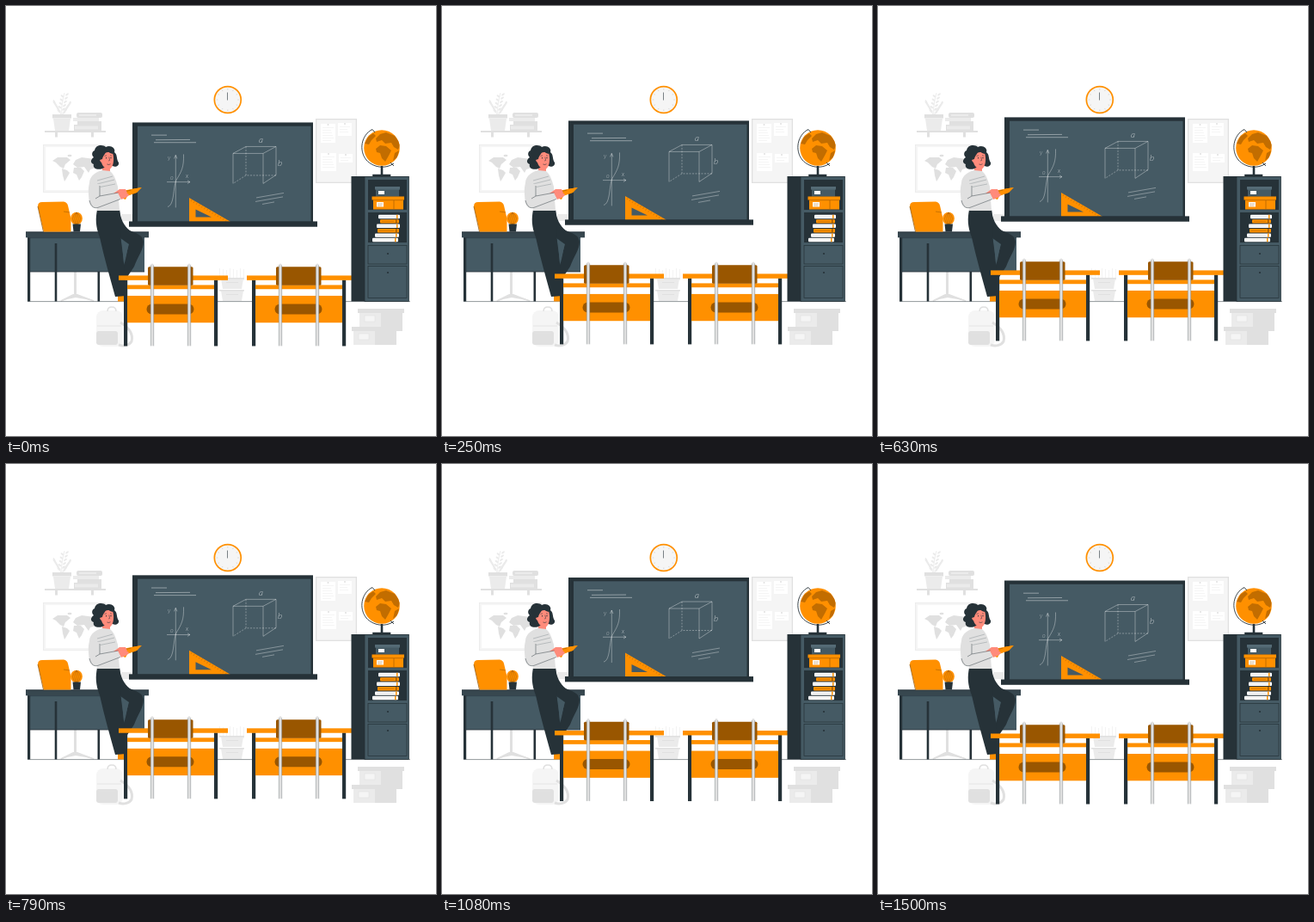
These frames come from a looping animation (500x500 px, 1.54 s). An HTML page with a canvas:

```html
<!DOCTYPE html>
<html lang="en">
<head>
<meta charset="utf-8">
<title>Classroom</title>
<style>
html, body { margin: 0; width: 100%; height: 100%; overflow: hidden; background: #fff; }
canvas { display: block; width: 500px; height: 500px; }
</style>
</head>
<body>
<canvas id="stage" width="500" height="500"></canvas>
<script>
const ctx = document.getElementById('stage').getContext('2d');
const ORANGE = '#ff9000', BROWN = '#995600', DARK = '#263238', SLATE = '#455a64';
const SKIN = '#ff8b7b', GREY = '#e0e0e0', PALE = '#ebebeb', FAINT = '#f5f5f5';
const LOOP = 1540, LIFT = 6.3, REST = 0.5, PEAK = 720;

function rect(x, y, w, h, color) {
  ctx.fillStyle = color;
  ctx.fillRect(x, y, w, h);
}
function round(x, y, w, h, r, color) {
  ctx.fillStyle = color;
  ctx.beginPath();
  ctx.roundRect(x, y, w, h, r);
  ctx.fill();
}
function frame(x, y, w, h, color, width = 0.6) {
  ctx.strokeStyle = color;
  ctx.lineWidth = width;
  ctx.strokeRect(x, y, w, h);
}
function fill(d, color) {
  ctx.fillStyle = color;
  ctx.fill(new Path2D(d));
}
function line(d, color, width = 0.6) {
  ctx.strokeStyle = color;
  ctx.lineWidth = width;
  ctx.stroke(new Path2D(d));
}
function oval(x, y, rx, ry, color, turn = 0) {
  ctx.fillStyle = color;
  ctx.beginPath();
  ctx.ellipse(x, y, rx, ry, turn, 0, 7);
  ctx.fill();
}
function shifted(x, y, draw) {
  ctx.save();
  ctx.translate(x, y);
  draw();
  ctx.restore();
}

function clock() {
  oval(257.8, 109, 16.3, 16.3, ORANGE);
  oval(257.8, 109, 14.6, 14.6, FAINT);
  for (let i = 0; i < 12; i++) {
    const a = i * Math.PI / 6, c = Math.cos(a), s = Math.sin(a);
    line(`M${257.8 + 11.5 * c} ${109 + 11.5 * s}L${257.8 + 13 * c} ${109 + 13 * s}`, '#b5b5b5', 0.5);
  }
  line('M257.5 100.5V109.5', DARK, 0.6);
}

function wallShelf() {
  rect(45, 145, 71, 2, GREY);
  rect(57, 147, 3, 5.5, GREY);
  rect(99, 147, 3, 5.5, GREY);
  fill('M55 131H75L73 145H57Z', PALE);
  rect(54, 126, 22, 4.5, GREY);
  line('M65 126C64 116 66 109 68 101M64 126C60 119 58 114 55 109M66 126C69 119 72 115 75 112', GREY, 0.6);
  for (let i = 0; i < 5; i++) {
    const y = 122 - i * 4.3, x = 64 + i;
    oval(x - 2.5, y, 2.2, 1.1, PALE, 0.6);
    oval(x + 3, y - 2, 2.2, 1.1, PALE, -0.6);
    oval(62 - i * 1.5, y * 0.6 + 49, 1.2, 2.2, PALE, -0.5);
    oval(68 + i * 1.6, y * 0.6 + 50, 1.2, 2.2, PALE, 0.5);
  }
  rect(79, 138, 32, 7, GREY);
  rect(80, 139.5, 27, 4, PALE);
  round(82, 124, 30, 6, 2, GREY);
  rect(78, 130, 30, 4, PALE);
  rect(83, 134, 28, 4, GREY);
  rect(85, 126, 20, 2, PALE);
}

function wallMap() {
  rect(43, 161, 73, 56, FAINT);
  frame(43.5, 161.5, 72, 55, PALE, 0.8);
  rect(46, 164, 67, 50, '#fff');
  fill('M54 180L60 176L71 176L75 179L69 184L67 189L63 187L58 182Z', GREY);
  fill('M65 189L71 191L74 194L70 201L68 204L66 197Z', GREY);
  fill('M78 184L81 179L88 176L103 178L110 182L105 188L98 190L96 194L91 187L83 188Z', GREY);
  fill('M79 188L87 188L91 192L88 199L85 203L82 196L78 194Z', GREY);
  oval(105, 199, 4.5, 3, GREY);
  oval(74, 174, 2.5, 1.3, GREY);
}

function notices() {
  rect(360, 131, 48, 75, GREY);
  rect(361.3, 132.3, 45.4, 72.4, FAINT);
  for (const [x, y, w, h] of [[366, 137, 17, 22], [386, 136, 16, 15], [366, 171, 18, 21], [387, 172, 16, 10]]) {
    rect(x, y, w, h, '#fff');
    oval(x + w / 2, y + 1, 1, 1, GREY);
    for (let k = 4; k < h - 2; k += 3) rect(x + 2, y + k, w - 4 - k % 4, 0.5, PALE);
  }
}

function floorItems() {
  rect(79, 309, 3, 27, GREY);
  fill('M62 343L78 335H83L104 343L81 339Z', GREY);
  line('M64 343L81 336L102 343', GREY, 1.5);

  round(105, 354, 31, 42, 8, FAINT);
  line('M118 355Q118 350 123 350Q128 350 128 355', GREY, 1.5);
  round(105, 378, 25, 16, 3, GREY);
  line('M133 368C143 374 148 382 146 390C143 395 136 396 131 394', GREY, 3);
  line('M106 372H134M108 381H127', GREY, 0.8);

  const box = (x, y, w, h) => {
    rect(x + 2, y + 5, w - 4, h - 5, PALE);
    rect(x, y, w, 5, GREY);
    rect(x + 8, y + 8, 12, 7, FAINT);
    frame(x + 8, y + 8, 12, 7, GREY);
  };
  box(409, 352, 54, 22);
  rect(436, 357, 25, 21, GREY);
  box(402, 373, 54, 21);
  rect(429, 378, 25, 16, GREY);

  for (let i = 0; i < 8; i++) rect(248 + i * 4, 305 + i % 3, 0.6, 13, PALE);
  for (const y of [317, 331]) {
    fill(`M250 ${y}H276L274 ${y + 12}H252Z`, PALE);
    rect(248, y - 1, 29, 1.5, GREY);
    rect(256, y + 4, 14, 1, GREY);
  }
  rect(134, 242, 13, 8, PALE);
}

function teacherDesk() {
  rect(26, 269, 135, 40, SLATE);
  rect(26, 269, 135, 1.2, '#34454e');
  line('M26 309H161', DARK, 0.8);
  rect(25, 269, 3.2, 74.5, DARK);
  rect(56.7, 276, 2.6, 67.5, DARK);
  rect(106.5, 309, 2.6, 34.5, DARK);
  rect(23, 262.5, 143, 6.8, '#37474f');
  line('M23 263H166', DARK, 0.8);

  fill('M37 233Q37 228 42 228L67 227.5Q71 228 72 232L75.5 247V262.5H44Z', ORANGE);
  line('M37 233L43.5 262.5', BROWN, 0.8);
  line('M67 239L74 240', BROWN, 0.5);
  oval(82, 247, 6.9, 7.3, ORANGE);
  for (let i = -2; i <= 2; i++) line(`M82 240Q${82 + i * 4.5} 247 82 255`, BROWN, 0.4);
  fill('M77.5 253.5H87L86 262.5H78.5Z', DARK);
}

function chalkboard() {
  const chalk = 'rgba(255,255,255,.7)';
  rect(147, 135, 210, 116, DARK);
  rect(153, 139.3, 201.5, 111, SLATE);
  line('M169 149.7H187M174 155.3L214 155M172 158.3H221', chalk, 0.6);
  line('M197.3 234V173M195.5 177L197.3 173L199 177M187 204.2H214M211 202.5L214 204.2L211 206', chalk, 0.5);
  line('M188 233C196 231 194 211 198 202C204 192 207 187 206.5 172', chalk, 0.5);
  line('M264 206V171H299V206M264 171L279 163H314L299 171M314 163V196L299 206', chalk, 0.5);
  ctx.setLineDash([2, 1.5]);
  line('M279 163V196.5H314M279 196.5L264 206', chalk, 0.5);
  ctx.setLineDash([]);
  line('M291 222.5L323 217M290 227L322 221.5M298 230L312 227.5', chalk, 0.5);
  ctx.fillStyle = chalk;
  const label = (text, x, y, size) => {
    ctx.font = `italic 300 ${size}px Lato, sans-serif`;
    ctx.fillText(text, x, y);
  };
  label('y', 188, 179, 7);
  label('x', 209, 200, 7);
  label('0', 191, 202, 6);
  label('a', 294, 159, 10);
  label('b', 316, 186, 10);

  ctx.fillStyle = ORANGE;
  ctx.fill(new Path2D('M213 222.5V250.3H261ZM220.5 236V245H239Z'), 'evenodd');
  for (let i = 1; i < 15; i++) {
    const x = 213 + i * 3.1, y = 223 + i * 1.8;
    line(`M${x} ${y}l-1.2 2`, BROWN, 0.4);
  }
  rect(143, 250, 219, 6.3, DARK);
}

function teacher() {
  fill('M130 337L138 335L139 343.5H130Z', ORANGE);
  // Legs
  fill('M119 238L132 237C133 247 137 256 144 261C151 264 160 267 160 274C160 283 153 292 149 303L139 318L133 310C139 300 140 289 142 279L126 262Z', DARK);
  fill('M106 237L132 237C134 249 133 262 134 274C137 294 139 317 140 337L127 338C121 316 114 292 109 269C104 256 104 247 106 237Z', DARK);
  fill('M134.5 271L143 277L137 299Z', SLATE);
  // Body
  fill('M110 180L121 182L121 194L113 196Z', SKIN);
  fill('M112 191L121 192C126 196 128 203 130 210L132 238H106C105 226 101 219 97 209C96 200 101 194 112 191Z', GREY);
  line('M106 203L124 198M106 207L126 202M107 211L127 207', '#8d9499', 0.5);
  // Book and arms
  fill('M135 215L146 213L157 211L152 217L141 221L139 225L133 223Z', ORANGE);
  line('M138 216L145 214L149 219', BROWN, 0.6);
  fill('M125 218L132 213L139 213L141 217L136 219L130 222Z', SKIN);
  fill('M97 206C95 213 96 220 97 229C99 235 103 236 108 234L134 224L131 217L109 221L110 207Z', GREY);
  line('M109 209L109 221L131 217M104 224L109 221M97 226C99 234 103 236 108 234L133 224.5', DARK, 0.45);
  fill('M130 217L138 216L143 219L141 222L134 225Z', SKIN);
  fill('M146 213L158 211L152 217L143 219Z', ORANGE);
  // Head
  fill('M103 168C104 161 113 161 116 164C121 161 128 165 126 170C130 173 128 178 131 182C132 186 127 188 124 186L114 188C108 192 100 189 102 184C97 182 99 178 102 176C99 173 100 169 103 168Z', DARK);
  fill('M112 171C116 171 121 168 124 171C126 177 125.5 186 121 189.5C116 190.5 112 186 111 182C108 180 109 176 111 177Z', SKIN);
  fill('M109 169C113 164 121 164 125 169L125 172C121 172 119 169 117 168C116 172 113 173 112 178L109 179Z', DARK);
  line('M114.5 174.5L117 173.8M121 173.7L123 174.2M119.8 175.5L120.7 179.5L119 180', DARK, 0.5);
  oval(116.5, 176.8, 0.6, 0.8, DARK);
  oval(122, 176.6, 0.6, 0.8, DARK);
  line('M117.5 184Q119.7 185.2 121.5 183.7', DARK, 0.6);
}

function studentDesk() {
  rect(137, 318, 4.2, 77, DARK);
  rect(242, 318, 4.2, 77, DARK);
  rect(141, 324, 101, 4.8, ORANGE);
  rect(141, 336.5, 101, 31.3, ORANGE);
  round(163.5, 346, 55, 12, 6, BROWN);
  rect(131, 313, 127, 5.4, ORANGE);
  round(165, 302.8, 52.5, 21.5, 1.5, BROWN);
  for (const x of [168.3, 211.3]) {
    round(x, 299, 3.4, 96, 1.7, GREY);
    line(`M${x} 301V395M${x + 3.4} 301V395`, '#7c8386', 0.5);
  }
}

function cabinet() {
  rect(401.5, 198, 16, 145.5, DARK);
  rect(417, 198, 51.5, 145.5, SLATE);
  frame(417, 198.4, 51.3, 145, DARK, 0.8);
  rect(421, 202, 45, 35, DARK);
  rect(421, 240, 45, 35, DARK);
  frame(421, 278.5, 45, 21.5, DARK, 0.7);
  frame(421, 302.5, 45, 37, DARK, 0.7);
  oval(444, 288, 1.1, 1.1, DARK);
  oval(444, 310, 1.1, 1.1, DARK);

  rect(430, 213, 27, 8.5, SLATE);
  rect(429, 210, 29, 3.5, '#546a75');
  rect(433, 215, 7, 4, '#fff');
  rect(427, 225, 35, 11.5, ORANGE);
  rect(425.5, 221.5, 37.5, 4, ORANGE);
  line('M426 225.7H463M451 226V236', BROWN, 0.6);
  rect(431, 228, 8, 5.5, '#fff');
  line('M432 230H438M432 232H437', BROWN, 0.4);

  const books = [[433, 25, '#fff'], [435, 22, ORANGE], [431, 27, '#fff'],
    [432, 25, ORANGE], [429, 28, '#fff'], [426, 30, '#fff']];
  books.forEach(([x, w, color], i) => {
    const y = 242.8 + i * 5.4, accent = color === ORANGE ? BROWN : ORANGE;
    round(x, y, w, 4.4, 1, color);
    rect(x + w - 4, y, 1.5, 4.4, accent);
    line(`M${x + 2} ${y + 2.2}h${w - 8}`, color === ORANGE ? BROWN : '#b5b5b5', 0.4);
  });
}

function globe() {
  rect(435.7, 186, 2.6, 10, DARK);
  round(426, 195.7, 21.5, 2.4, 1, DARK);
  line('M426 143.5C413 150 410 168 419 179C427 188 441 190 451 183', DARK, 0.9);
  oval(437, 165, 20.8, 20.8, ORANGE);
  ctx.save();
  ctx.beginPath();
  ctx.arc(437, 165, 20.8, 0, 7);
  ctx.clip();
  const land = '#c26d00';
  fill('M417 160L421 152L427 148L430 151L425 156L422 161Z', land);
  fill('M430 154L435 149L442 147L452 151L459 160L456 167L451 164L448 159L441 160L437 156L431 158Z', land);
  fill('M430 166L435 162L442 163L448 168L445 174L441 181L437 177L435 171L431 170Z', land);
  fill('M452 171L457 168L455 176L450 180Z', land);
  ctx.restore();
  line('M426 143.5L429 147M447 182L451 186', DARK, 0.9);
}

function draw(now) {
  const t = now % LOOP;
  const y = REST - LIFT * (1 + Math.cos(2 * Math.PI * (t - PEAK) / LOOP)) / 2;
  rect(0, 0, 500, 500, '#fff');
  clock();
  wallShelf();
  wallMap();
  notices();
  floorItems();
  line('M25 343.6H470', DARK, 0.5);
  shifted(0, y, chalkboard);
  teacherDesk();
  teacher();
  shifted(0, y, studentDesk);
  shifted(149, y, studentDesk);
  cabinet();
  globe();
}

const start = performance.now();
function tick() {
  draw(performance.now() - start);
  requestAnimationFrame(tick);
}
tick();
</script>
</body>
</html>
```
